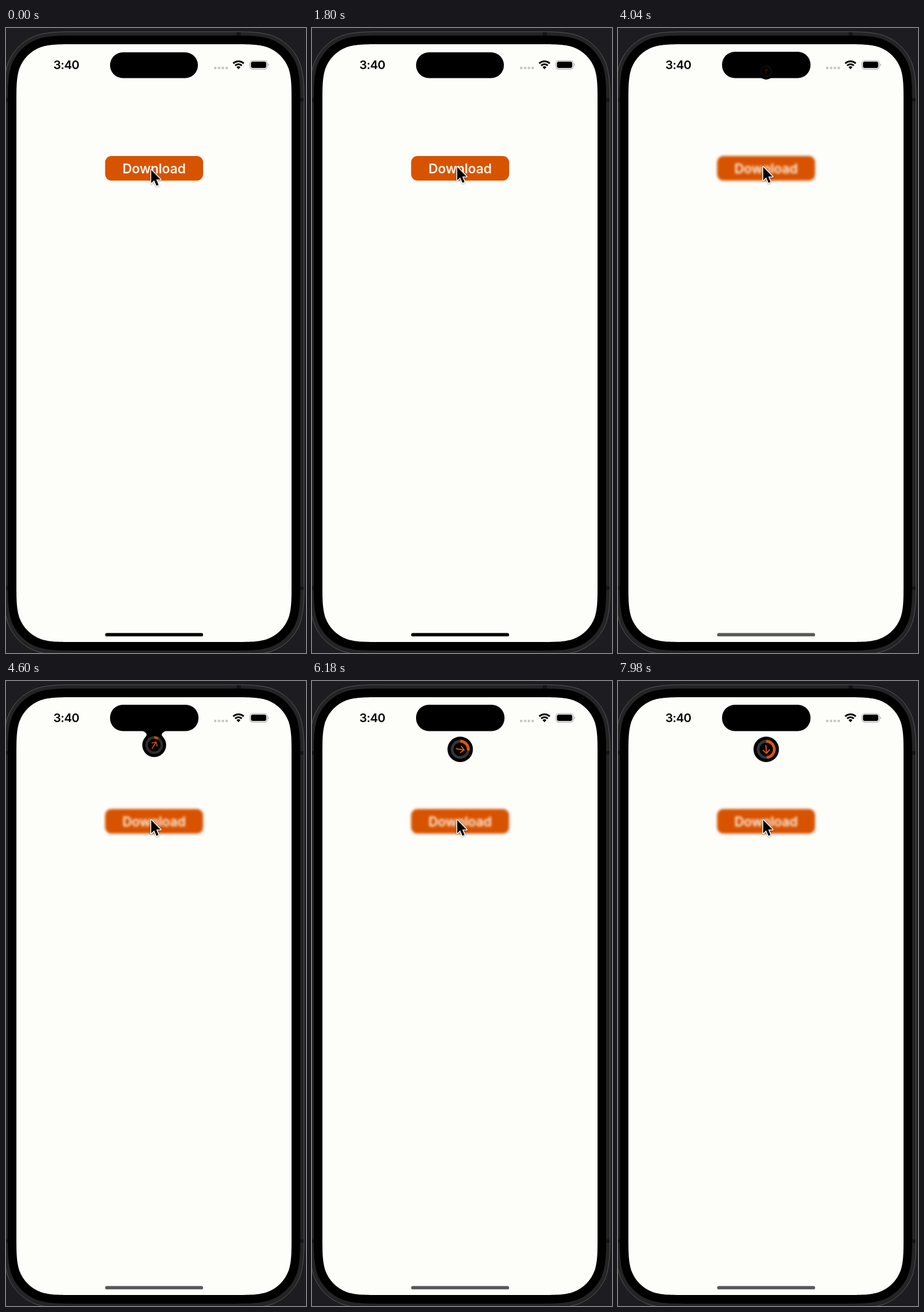
Recreate the animation shown at these times as an HTML page. Size 519 px wide and 1079 px high, loop 8000 ms.

```html
<!DOCTYPE html>
<html lang="en">
<head>
<meta charset="utf-8">
<title>Download progress</title>
<style>
  html, body { margin: 0; width: 100%; height: 100%; overflow: hidden; background: #1c1c21; }
  svg { display: block; width: 519px; height: 1079px; }
  text { font-family: Inter, Roboto, sans-serif; }
</style>
</head>
<body>
<svg viewBox="0 0 519 1079">
  <rect width="519" height="1079" fill="#1c1c21"/>

  <!-- phone body -->
  <path id="shell" fill="#242425" stroke="#57575a"/>
  <g fill="#141416">
    <rect x="0" y="121" width="3" height="6"/>
    <rect x="0" y="964" width="3" height="6"/>
    <rect x="509" y="121" width="6" height="6"/>
    <rect x="509" y="964" width="6" height="6"/>
    <rect x="399" y="7" width="7" height="6"/>
  </g>
  <path id="bezel"/>
  <path id="screen" fill="#fdfdfa"/>

  <!-- status bar -->
  <text x="82" y="71" font-size="20.6" font-weight="600" letter-spacing="-.6">3:40</text>
  <path d="M360 69H384" stroke="#c6c6c8" stroke-width="4" stroke-dasharray="4 2.6"/>
  <g transform="translate(402.2 71.2)">
    <g fill="none" stroke="#000" stroke-width="3">
      <path d="M-9.1 -10.1A13.6 13.6 0 0 1 9.1 -10.1"/>
      <path d="M-5.75 -6.4A8.6 8.6 0 0 1 5.75 -6.4"/>
    </g>
    <path d="M0 0L-3.3 -3.7A5 5 0 0 1 3.3 -3.7Z"/>
  </g>
  <rect x="422" y="56.3" width="30" height="14.6" rx="4.6" fill="none" stroke="#a0a0a2" stroke-width="1.1"/>
  <rect x="423.8" y="58.1" width="26.4" height="11" rx="3"/>
  <path d="M453.6 61.2a3 3 0 0 1 0 5z" fill="#a0a0a2"/>

  <!-- button -->
  <g id="button">
    <rect x="171.5" y="221" width="169.5" height="42.5" rx="11" fill="#d75300"/>
    <text x="256.2" y="251" font-size="22.8" font-weight="600" letter-spacing="-.15" text-anchor="middle" fill="#fff5ea">Download</text>
  </g>

  <!-- island and the drop that leaves it -->
  <rect id="island" x="180" y="42" width="152" height="44.5" rx="22.2"/>
  <path id="neck"/>
  <g id="drop">
    <circle r="22"/>
    <g id="dial" fill="none">
      <circle r="14" stroke="#363636" stroke-width="4.8"/>
      <path id="arc" stroke="#d9570d" stroke-width="4.8"/>
      <path id="arrow" d="M0 6.8V-6.6M-5.4 -1.3L0 -6.8L5.4 -1.3" stroke="#d9570d" stroke-width="2"
            stroke-linecap="round" stroke-linejoin="round"/>
    </g>
  </g>

  <rect id="home" x="171.5" y="1044.5" width="169.5" height="5.8" rx="2.9"/>

  <g id="cursor" style="filter:drop-shadow(0 1.5px 1.5px rgba(0,0,0,.35))">
    <path d="M0 0V22.8L5.1 18.1L9.1 27.2L12.7 25.7L8.8 16.5H16.2Z" stroke="#fff" stroke-width="3"
          paint-order="stroke" stroke-linejoin="round"/>
  </g>
</svg>

<script>
const LOOP = 8000;
const TAP = 3700;          // button becomes disabled
const START = 3870;        // progress begins
const DEG_PER_MS = 0.0425;
const CX = 256.4;

const $ = id => document.getElementById(id);
const set = (id, attrs) => {
  for (const key in attrs) $(id).setAttribute(key, attrs[key]);
};
const clamp = v => Math.min(1, Math.max(0, v));
const ramp = (t, from, to) => clamp((t - from) / (to - from));
const smooth = v => v * v * (3 - 2 * v);

// Rounded box whose corners ease into the straight edges
function softBox(left, top, right, bottom, r) {
  const curve = [[0, 1.529], [0, 1.088], [0, 0.868], [0.075, 0.631], [0.169, 0.373],
                 [0.373, 0.169], [0.631, 0.075], [0.868, 0], [1.088, 0], [1.529, 0]];
  const corner = (x, y, sx, sy) => {
    const pts = curve.map(([u, v]) => `${x + sx * u * r} ${y + sy * v * r}`);
    if (sx !== sy) pts.reverse();
    return `${pts[0]}C${pts.slice(1).join(" ")}`;
  };
  return "M" + [
    corner(left, top, 1, 1), corner(right, top, -1, 1),
    corner(right, bottom, -1, -1), corner(left, bottom, 1, -1)
  ].join("L") + "Z";
}

function arcPath(deg, r) {
  const a = deg * Math.PI / 180;
  return `M0 ${-r}A${r} ${r} 0 ${deg > 180 ? 1 : 0} 1 ${r * Math.sin(a)} ${-r * Math.cos(a)}`;
}

// Liquid bridge between the island's lower edge and the drop
function neckPath(y, r, out) {
  const side = r * 0.71, join = y - side, base = 86;
  if (join <= base || out > 0.95) return "";
  const pinch = 10 * clamp((1 - out) / 0.14);
  const mid = base + (join - base) * 0.5;
  return `M${CX - 20} ${base}Q${CX - pinch} ${mid} ${CX - side} ${join}` +
         `H${CX + side}Q${CX + pinch} ${mid} ${CX + 20} ${base}Z`;
}

function draw(t) {
  const tip = 245 - 5 * smooth(ramp(t, 100, 600));
  set("cursor", { transform: `translate(251.2 ${tip})` });

  const off = smooth(ramp(t, TAP, TAP + 250));
  $("button").style.filter = off ? `blur(${2.3 * off}px)` : "none";
  const grey = Math.round(88 * off);
  set("home", { fill: `rgb(${grey},${grey},${grey})` });
  set("island", { y: 42 - off, width: 152 + off, height: 44.5 + off });

  // The drop is fully out at a tenth of the ring
  const deg = Math.max(0, (t - START) * DEG_PER_MS);
  const out = clamp(deg / 36);
  const y = 64 + 54 * out;
  const scale = 0.55 + 0.45 * out;
  set("drop", { transform: `translate(${CX} ${y}) scale(${scale})` });
  set("dial", { opacity: out });
  set("arc", { d: arcPath(deg, 14) });
  set("arrow", { transform: `rotate(${deg})` });
  set("neck", { d: neckPath(y, 22 * scale, out) });
}

set("shell", { d: softBox(-3.5, 6.5, 515.5, 1082.5, 88) });
set("bezel", { d: softBox(3, 13, 509, 1075, 82) });
set("screen", { d: softBox(18, 28, 494, 1060, 67) });

const begin = performance.now();
function tick() {
  draw((performance.now() - begin) % LOOP);
  requestAnimationFrame(tick);
}
tick();
</script>
</body>
</html>
```
